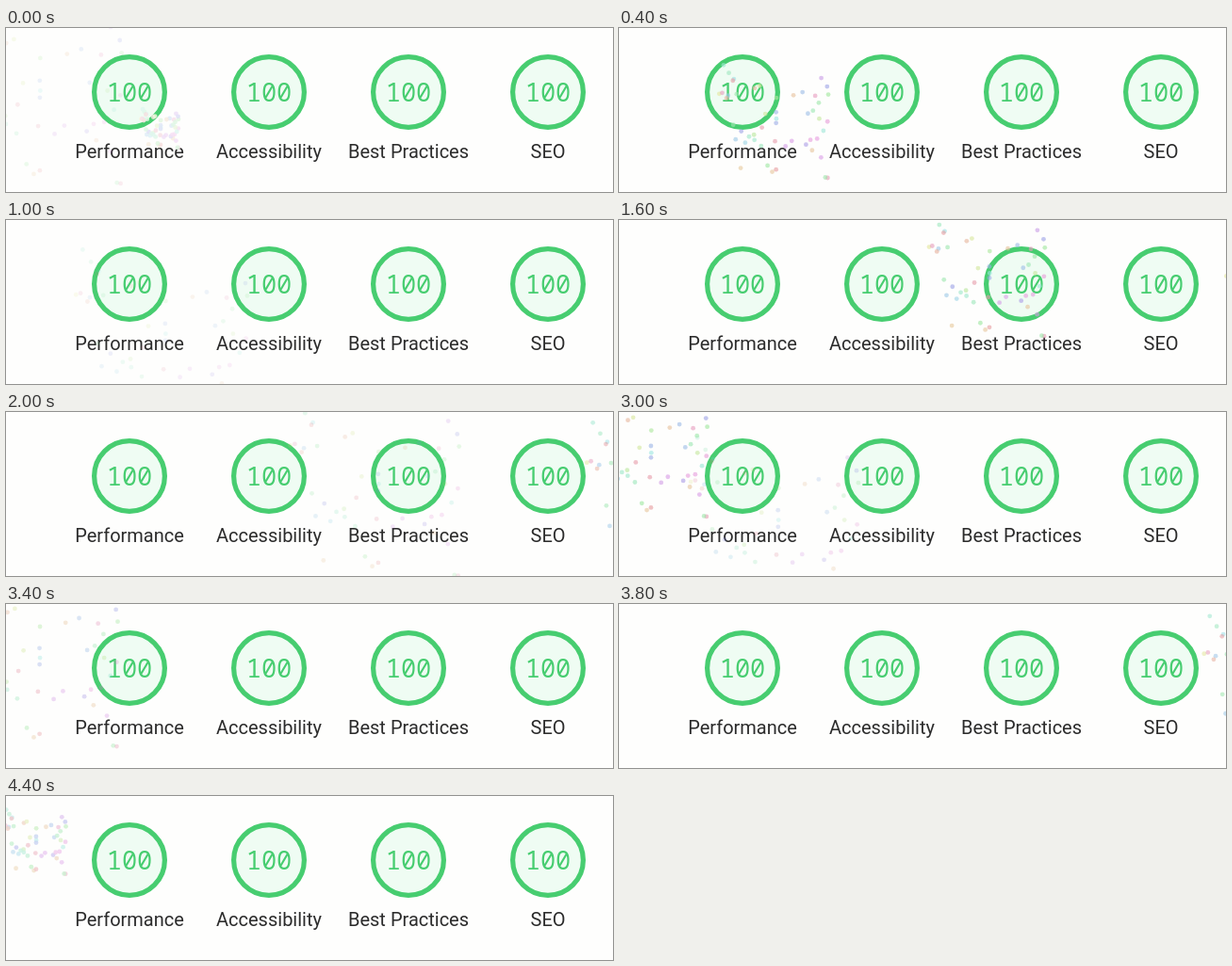
An HTML page with a canvas that plays this animation: 644x174 px, repeating every 4.6 s.

```html
<!DOCTYPE html>
<html lang="en">
<head>
<meta charset="utf-8">
<title>Perfect scores</title>
<style>
  html, body { margin: 0; width: 100%; height: 100%; overflow: hidden; background: #fefefd; }
  svg, canvas { position: absolute; left: 0; top: 0; }
  text { text-anchor: middle; }
  .ring { fill: #effcf3; stroke: #47cd70; stroke-width: 5.2px; }
  .score { font: 500 27px "Roboto Mono", "Noto Sans Mono", monospace; fill: #47cd70; }
  .label { font: 20px Roboto, sans-serif; fill: #2c2c2c; }
</style>
</head>
<body>
<svg id="gauges" width="644" height="174"></svg>
<canvas id="sky" width="644" height="174"></canvas>
<script>
const LOOP = 4600, STEP = 200;
const PAGE_WIDTH = 1330, GRAVITY = 80, SPARKS = 51;

document.getElementById('gauges').innerHTML =
  ['Performance', 'Accessibility', 'Best Practices', 'SEO'].map((name, i) => `
    <g transform="translate(${131 + 148 * i} 68)">
      <circle class="ring" r="37.4"/>
      <text class="score" y="9.5">100</text>
      <text class="label" y="70">${name}</text>
    </g>`).join('');

let seed = 20117;
function random(min, max) {
  seed = seed * 16807 % 2147483647;
  return min + (max - min) * seed / 2147483647;
}

// Every burst throws the same sparks, mostly upwards
const sparks = Array.from({ length: SPARKS }, () => ({
  x: random(-95, 97),
  y: random(-163, 33),
  hue: random(0, 360),
}));

// Burst centres as fractions of the wide page, visited in turn
const spots = [[.47, .04], [.30, .07], [.70, .06], [.20, .03], [.80, .03]];

const launchers = [
  { start: 135, period: 1000, firstSpot: 4 },
  { start: -122, period: 1250, firstSpot: 1 },
];

// cubic-bezier(x1, 0, x2, 1)
function bezier(x1, x2, p) {
  let low = 0, high = 1;
  for (let i = 0; i < 20; i++) {
    const u = (low + high) / 2, v = 1 - u;
    if (3 * u * v * v * x1 + 3 * u * u * v * x2 + u ** 3 < p) low = u; else high = u;
  }
  return low * low * (3 - 2 * low);
}
const easeOut = p => bezier(0, .58, p);
const easeIn = p => bezier(.42, 1, p);

const ctx = document.getElementById('sky').getContext('2d');

function drawBurst({ start, period, firstSpot }, time) {
  const cycles = (time - start) / period;
  const turn = Math.floor(cycles);
  const [left, top] = spots[(turn + firstSpot + 5) % 5];
  const spread = easeOut(cycles - turn);
  const fall = easeIn(cycles - turn);
  const cx = left * PAGE_WIDTH - 236.3;
  const cy = top * PAGE_WIDTH + 24.5 + fall * GRAVITY;

  ctx.globalAlpha = .85 * (1 - fall);
  for (const { x, y, hue } of sparks) {
    ctx.fillStyle = `hsl(${hue}, 60%, ${100 - 37 * spread}%)`;
    ctx.beginPath();
    ctx.arc(cx + x * spread, cy + y * spread, 2.4, 0, 2 * Math.PI);
    ctx.fill();
  }
}

// The picture advances in steps; the fireworks run slightly slower than the clock
function steppedTime(now) {
  return 48 + Math.floor((now % LOOP) / STEP) * STEP * .9825;
}

const origin = performance.now();
function draw() {
  const time = steppedTime(Math.max(0, performance.now() - origin));
  ctx.clearRect(0, 0, 644, 174);
  launchers.forEach(launcher => drawBurst(launcher, time));
  requestAnimationFrame(draw);
}
draw();
</script>
</body>
</html>
```
